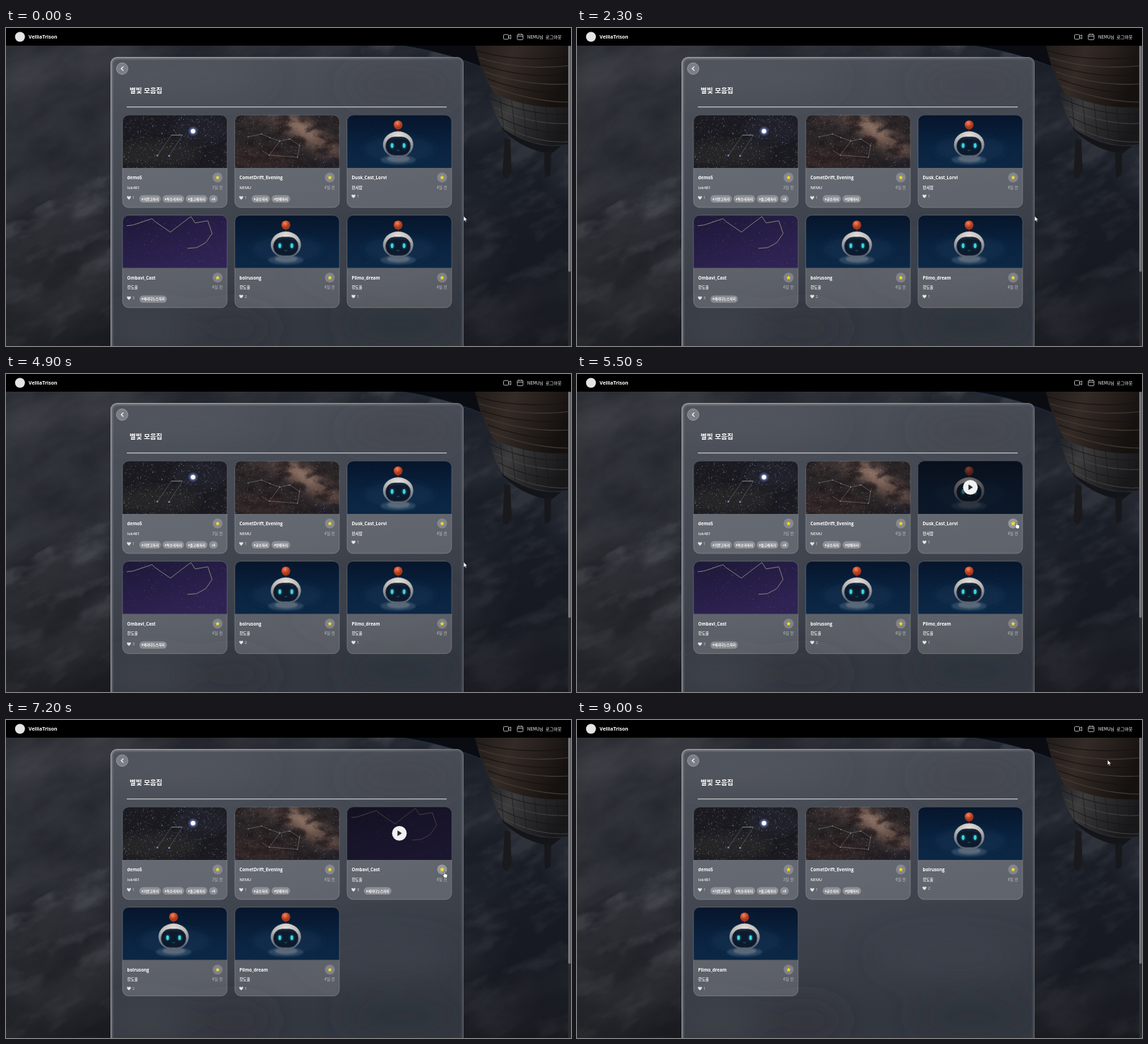
An HTML page that plays this animation: 800x450 px, repeating every 9100 ms.

```html
<!DOCTYPE html>
<html lang="ko">
<head>
<meta charset="utf-8">
<title>Gallery</title>
<style>
html, body { margin: 0; width: 100%; height: 100%; overflow: hidden; background: #000; }
svg { position: absolute; left: 0; top: 0; width: 800px; height: 450px; display: block; }
#back { will-change: transform; }
text { font-family: "Open Sans", "Noto Sans CJK KR", "Noto Sans CJK", sans-serif; fill: #fff; }
.ko { font-family: "Noto Sans CJK KR", "Noto Sans CJK", sans-serif; }
.head { font-size: 6.2px; font-weight: 700; }
.by { font-size: 5.5px; font-weight: 600; fill: #ececee; }
.date { font-size: 5.6px; fill: #bfc1c5; text-anchor: end; }
.count { font-size: 5.4px; fill: #d6d7da; }
.tag { font-size: 4.7px; font-weight: 700; text-anchor: middle; }
</style>
</head>
<body>
<svg id="back" viewBox="0 0 800 450">
  <defs>
    <filter id="clouds" x="0" y="0" width="1" height="1" color-interpolation-filters="sRGB">
      <feTurbulence type="fractalNoise" baseFrequency=".007 .013" numOctaves="6" seed="8"/>
      <feColorMatrix values="0 0 0 0 .34  0 0 0 0 .35  0 0 0 0 .37  1.6 0 0 0 -.5"/>
    </filter>
    <filter id="clumps" x="0" y="0" width="1" height="1" color-interpolation-filters="sRGB">
      <feTurbulence type="fractalNoise" baseFrequency=".014 .03" numOctaves="6" seed="23"/>
      <feColorMatrix values="0 0 0 0 .33  0 0 0 0 .34  0 0 0 0 .37  3.4 0 0 0 -1.65"/>
    </filter>
    <filter id="soft" x="-50%" y="-50%" width="200%" height="200%"><feGaussianBlur stdDeviation="22"/></filter>
    <filter id="glow" x="-5%" y="-5%" width="110%" height="110%"><feGaussianBlur stdDeviation="1.6"/></filter>
    <linearGradient id="earth" x2="1" y2=".45">
      <stop offset="0" stop-color="#26292f"/><stop offset=".3" stop-color="#23262c"/>
      <stop offset=".75" stop-color="#1e222b"/><stop offset="1" stop-color="#1a1d25"/>
    </linearGradient>
    <linearGradient id="fall" x2="0" y2="1">
      <stop offset=".5" stop-color="#121216" stop-opacity="0"/><stop offset="1" stop-color="#121216" stop-opacity=".5"/>
    </linearGradient>
    <linearGradient id="gold" x2="1" y2=".3">
      <stop offset="0" stop-color="#211c1a"/><stop offset=".4" stop-color="#342b27"/><stop offset="1" stop-color="#15110f"/>
    </linearGradient>
    <linearGradient id="steel" x2="1" y2=".4">
      <stop offset="0" stop-color="#1f2125"/><stop offset=".35" stop-color="#3d3c3d"/>
      <stop offset=".65" stop-color="#29282a"/><stop offset="1" stop-color="#18181a"/>
    </linearGradient>
    <linearGradient id="glass" x2=".25" y2="1">
      <stop offset="0" stop-color="#4f535b"/><stop offset=".5" stop-color="#424751"/><stop offset="1" stop-color="#343841"/>
    </linearGradient>
    <linearGradient id="edge"><stop offset="0" stop-color="#fff"/><stop offset=".8" stop-color="#fff" stop-opacity=".8"/><stop offset="1" stop-color="#fff" stop-opacity=".4"/></linearGradient>
    <clipPath id="pane"><path d="M148 450V50a9 9 0 0 1 9-9H639a9 9 0 0 1 9 9V450Z"/></clipPath>
  </defs>
  <rect width="800" height="450" fill="url(#earth)"/>
  <rect x="-250" y="-250" width="1300" height="1000" transform="rotate(-28 150 220)" filter="url(#clouds)" opacity=".55"/>
  <rect x="-250" y="200" width="1300" height="600" transform="rotate(-28 150 220)" filter="url(#clumps)" opacity=".6"/>
  <rect x="640" y="25" width="160" height="425" fill="#181c27" opacity=".4"/>
  <rect width="800" height="450" fill="url(#fall)"/>
  <path d="M560 25Q712 48 800 140V25Z" fill="#0a0c12"/>
  <path d="M560 25Q712 48 800 140" fill="none" stroke="#28405f" stroke-width="1.6" opacity=".4"/>
  <g id="craft"></g>
  <g clip-path="url(#pane)">
    <rect x="148" y="41" width="500" height="409" fill="url(#glass)"/>
    <g filter="url(#soft)">
      <ellipse cx="250" cy="70" rx="120" ry="22" fill="#5c6067" opacity=".4"/>
      <ellipse cx="560" cy="80" rx="80" ry="20" fill="#40444d" opacity=".5"/>
      <ellipse cx="200" cy="430" rx="60" ry="26" fill="#494b51" opacity=".5"/>
      <ellipse cx="320" cy="425" rx="60" ry="25" fill="#30333a" opacity=".5"/>
      <ellipse cx="530" cy="335" rx="110" ry="28" fill="#464a53" opacity=".4"/>
      <ellipse cx="560" cy="420" rx="90" ry="30" fill="#2f323a" opacity=".5"/>
    </g>
    <path d="M148 460V50a9 9 0 0 1 9-9H639a9 9 0 0 1 9 9V460" fill="none" stroke="url(#edge)" stroke-width="5" opacity=".33" filter="url(#glow)"/>
    <path d="M148.5 460V50a8.5 8.5 0 0 1 8.5-8.5H639a8.5 8.5 0 0 1 8.5 8.5V460" fill="none" stroke="url(#edge)" opacity=".25"/>
  </g>
  <rect width="800" height="25" fill="#000"/>
  <circle cx="19.8" cy="12.5" r="7" fill="#e4e4e6"/>
  <text x="32" y="14.8" font-size="7" font-weight="700">VelliaTrison</text>
  <g fill="none" stroke="#d8d8da" stroke-width=".8" stroke-linejoin="round">
    <rect x="704.5" y="9.3" width="7" height="6.6" rx="1.2"/><path d="M711.5 11.8l3.3-2v5.6l-3.3-2"/>
    <rect x="724" y="9" width="8" height="7.6" rx="1.2"/><path d="M724 11.6h8M726 8v2M730 8v2"/>
  </g>
  <text class="ko" x="738" y="14.8" font-size="6.1" font-weight="500">NEMU님</text>
  <text class="ko" x="764" y="14.8" font-size="6.2" font-weight="500">로그아웃</text>
  <rect x="796" y="25" width="4" height="425" fill="#2b2c30"/>
  <rect x="796" y="25" width="3.6" height="320" rx="1.8" fill="#74767a"/>
  <circle cx="164.5" cy="57.5" r="8.2" fill="#fff" fill-opacity=".25" stroke="#fff" stroke-opacity=".4" stroke-width=".7"/>
  <path d="M166 54.8l-2.8 2.7 2.8 2.7" fill="none" stroke="#fff" stroke-width="1.1" stroke-linecap="round" stroke-linejoin="round"/>
  <text class="ko" x="175" y="91.6" font-size="9.5" font-weight="700">별빛 모음집</text>
  <rect x="171" y="111.3" width="453" height="1" fill="#e2e3e5"/>
</svg>

<svg id="front" viewBox="0 0 800 450">
  <defs>
    <clipPath id="top"><path d="M0 75V9a9 9 0 0 1 9-9H139.5a9 9 0 0 1 9 9V75Z"/></clipPath>
    <filter id="b1" x="-50%" y="-50%" width="200%" height="200%"><feGaussianBlur stdDeviation="1.2"/></filter>
    <filter id="b6" x="-50%" y="-50%" width="200%" height="200%"><feGaussianBlur stdDeviation="6"/></filter>
    <filter id="dust" x="0" y="0" width="1" height="1" color-interpolation-filters="sRGB">
      <feTurbulence type="fractalNoise" baseFrequency=".05 .09" numOctaves="4" seed="4"/>
      <feColorMatrix values="0 0 0 0 .13  0 0 0 0 .1  0 0 0 0 .11  3.5 0 0 0 -1.5"/>
    </filter>
    <linearGradient id="navy" x2="0" y2="1">
      <stop offset="0" stop-color="#06152b"/><stop offset=".6" stop-color="#0a2340"/><stop offset="1" stop-color="#0c2745"/>
    </linearGradient>
    <linearGradient id="violet" x2=".6" y2="1">
      <stop offset="0" stop-color="#1d1838"/><stop offset="1" stop-color="#2f2354"/>
    </linearGradient>
    <radialGradient id="ball" cx=".4" cy=".3"><stop offset="0" stop-color="#f58a5e"/><stop offset=".5" stop-color="#dc552f"/><stop offset="1" stop-color="#a13a20"/></radialGradient>
    <radialGradient id="shell" cx=".5" cy=".22" r=".8"><stop offset="0" stop-color="#ebe6df"/><stop offset=".5" stop-color="#b9b6b4"/><stop offset="1" stop-color="#4c596b"/></radialGradient>
    <radialGradient id="halo"><stop offset="0" stop-color="#fff"/><stop offset=".3" stop-color="#dfe8ff"/><stop offset=".5" stop-color="#7c8fd8" stop-opacity=".6"/><stop offset="1" stop-color="#4a56a0" stop-opacity="0"/></radialGradient>
    <g id="star"><path d="M0-3.2L.95-1.05 3.2-.9 1.5.65 2 2.9 0 1.7-2 2.9-1.5.65-3.2-.9-.95-1.05Z" fill="#f3dd1c"/></g>
    <path id="heart" d="M0 2.6C-4.2-.4-2.7-2.7-1.3-2.4-.5-2.3 0-1.5 0-1.2 0-1.5.5-2.3 1.3-2.4 2.7-2.7 4.2-.4 0 2.6Z" fill="#e4e5e8"/>
  </defs>
  <g id="cards"></g>
  <g id="hover" transform="translate(482.7 123)">
    <path d="M0 75V9a9 9 0 0 1 9-9H139.5a9 9 0 0 1 9 9V75Z" fill="#0b0c12" fill-opacity=".55"/>
    <circle cx="74.3" cy="37.3" r="10.4" fill="#f1f1f2"/>
    <path d="M72 33.8v7l5.4-3.5Z" fill="#26282d" stroke="#26282d" stroke-width=".6" stroke-linejoin="round"/>
    <circle cx="134.8" cy="88.5" r="7" fill="#fff" fill-opacity=".14"/>
    <use href="#star" x="134.8" y="88.5"/>
  </g>
  <path id="arrow" d="M0 0V7.4L1.7 5.9 2.8 8.4 4 7.9 2.9 5.4H5.2Z" fill="#fff" stroke="#111" stroke-width=".45"/>
  <path id="hand" d="M-.7 4.4V.6a.7.7 0 0 1 1.4 0V3l3 .7q.8.2.7 1L4 7.4 3.5 9H.3L-2.3 5.7q-.3-.9.6-.9Z" fill="#fff" stroke="#111" stroke-width=".5" stroke-linejoin="round"/>
</svg>

<script>
const LOOP = 9100, FIRST = 6050, SECOND = 7950, LEAVE = 8585;
const $ = id => document.getElementById(id);

function rng(seed) {
  return () => {
    seed = (seed * 1664525 + 1013904223) >>> 0;
    return seed / 4294967296;
  };
}

// Dots scattered over a thumbnail, as one path
function dots(n, seed, size, color, opacity) {
  const r = rng(seed);
  let d = '';
  for (let i = 0; i < n; i++) d += `M${(r() * 148).toFixed(1)} ${(r() * 75).toFixed(1)}h.01`;
  return `<path d="${d}" stroke="${color}" stroke-width="${size}" stroke-linecap="round" opacity="${opacity}"/>`;
}

const fill = c => `<rect width="149" height="75" fill="${c}"/>`;
const blob = (x, y, rx, ry, c, o, turn = 0) =>
  `<ellipse rx="${rx}" ry="${ry}" fill="${c}" opacity="${o}" transform="translate(${x} ${y}) rotate(${turn})"/>`;
const line = (d, c, w = .6) =>
  `<path d="${d}" fill="none" stroke="${c}" stroke-width="${w}" stroke-linejoin="round"/>`;

const art = {
  lyre: fill('#1a1a20') +
    `<g filter="url(#b6)">${blob(50, 55, 60, 18, '#2b2829', .7)}${blob(110, 20, 40, 20, '#23232d', .7)}</g>` +
    dots(520, 5, .65, '#9a9aa2', .55) + dots(100, 9, .9, '#d5d3d4', .65) + dots(22, 14, 1.2, '#8f9ce0', .8) +
    line('M69.5 28.5H85', '#c4c8cf', .6) + line('M85 28.5L66 58M69.5 28.5L49.5 57.5', '#7d838f', .45) +
    `<circle cx="49.5" cy="57.5" r="1.2" fill="#7f90ee"/><circle cx="66" cy="58" r="1.2" fill="#7f90ee"/>
     <circle cx="100" cy="23" r="8" fill="url(#halo)"/><circle cx="100" cy="23" r="3" fill="#fff"/>`,
  galaxy: fill('#2a2628') +
    `<g filter="url(#b6)">${blob(30, 62, 50, 16, '#362725', .6)}${blob(60, 8, 50, 12, '#443a39', .7)}
     ${blob(104, 28, 58, 15, '#6e574e', .8, 32)}${blob(97, 20, 24, 7, '#a58676', .7, 32)}${blob(140, 70, 32, 14, '#20202b', .8)}</g>
     <rect width="149" height="75" filter="url(#dust)" opacity=".75"/>` +
    dots(480, 21, .6, '#a8978f', .5) + dots(90, 25, .8, '#e4d0c4', .6) + dots(50, 29, 1, '#6c79b5', .45) +
    line('M19 31L38 27 50 32 64 37 49 57 64 58 89 60 92 43 78 34 64 37M49 57L38 50', '#a7a09d', .4) +
    '<path d="M19 31h.01M38 27h.01M50 32h.01M64 37h.01M49 57h.01M89 60h.01M92 43h.01M78 34h.01" stroke="#e4e0de" stroke-width="1.2" stroke-linecap="round"/>',
  robot: fill('url(#navy)') +
    `<g filter="url(#b6)">${blob(74, 48, 50, 18, '#12375b', .4)}</g>` +
    dots(45, 33, .6, '#5c7ba0', .35) +
    `<g filter="url(#b1)">${blob(72.5, 63.5, 25, 6.5, '#38526c', .7)}${blob(73, 62, 16, 5, '#7d868f', .55)}</g>
     <path d="M72.5 19v5" stroke="#6e2d20" stroke-width="1.2"/>
     <circle cx="72.5" cy="14" r="6.3" fill="url(#ball)"/>
     <ellipse cx="72.5" cy="42" rx="21.5" ry="18.7" fill="url(#shell)"/>
     <rect x="54.8" y="31" width="35.4" height="26.4" rx="12.8" fill="#0d1a2d" stroke="#4f5a6a" stroke-width=".8"/>
     <path d="M61 35q11-4 23 0" fill="none" stroke="#2c4562" stroke-width="1" opacity=".5"/>
     <g filter="url(#b1)" opacity=".4"><ellipse cx="64" cy="43.3" rx="3" ry="4.4" fill="#20bccb"/><ellipse cx="81" cy="43.3" rx="3" ry="4.4" fill="#20bccb"/></g>
     <ellipse cx="64" cy="43.3" rx="2" ry="3.4" fill="#3fd6df"/><ellipse cx="81" cy="43.3" rx="2" ry="3.4" fill="#3fd6df"/>
     <path d="M70.5 49.8q2 1.4 4 0" fill="none" stroke="#2a7f92" stroke-width=".7"/>`,
  river: fill('url(#violet)') +
    dots(200, 41, .55, '#7f739f', .5) + dots(25, 45, .8, '#b3a8cc', .5) +
    line('M6 15L15 14 42 5 46 9 68 24 81 14 97 2 103 11 121 8 127 26 118 39 105 46 92 47', '#a8ae8c', .7)
};

const tags = {
  lyre: [['#거문고자리', 24, 30.5], ['#독수리자리', 56.8, 30.7], ['#돌고래자리', 89.7, 30.7], ['+6', 122.8, 12.2]],
  galaxy: [['#궁수자리', 24, 26], ['#방패자리', 52.2, 26.4]],
  robot: [],
  river: [['#에리다누스자리', 24, 39]]
};

// image, title, author, days, likes, slot in each of the three layouts
const items = [
  ['lyre', 'demo5', 'lok481', 3, 1, [0, 0, 0]],
  ['galaxy', 'CometDrift_Evening', 'NEMU', 4, 1, [1, 1, 1]],
  ['robot', 'Dusk_Cast_Lorvi', '민서람', 4, 1, [2, -1, -1]],
  ['river', 'Ombavi_Cast', '강도율', 4, 3, [3, 2, -1]],
  ['robot', 'bolrusong', '강도율', 4, 2, [4, 3, 2]],
  ['robot', 'Plimo_dream', '강도율', 4, 1, [5, 4, 3]]
];

function card([img, title, by, days, likes]) {
  const list = tags[img], y = list.length ? 117.3 : 115.2;
  const pills = list.map(([s, x, w]) =>
    `<rect x="${x}" y="113.6" width="${w}" height="10.4" rx="5.2" fill="#fff" fill-opacity=".27"/>
     <text class="tag ko" x="${x + w / 2}" y="120.6">${s}</text>`).join('');
  return `<g><rect class="box" width="148.5" height="131" rx="9" fill="#fff" fill-opacity=".18"/>
    <g clip-path="url(#top)">${art[img]}</g>
    <rect class="box" x=".3" y=".3" width="147.9" height="131" rx="8.7" fill="none" stroke="#fff" stroke-opacity=".24" stroke-width=".7"/>
    <text class="head" x="6.8" y="90.8">${title}</text>
    <circle cx="134.8" cy="88.5" r="7" fill="#fff" fill-opacity=".22"/><use href="#star" x="134.8" y="88.5"/>
    <text class="by" x="6.8" y="104.7">${by}</text>
    <text class="date ko" x="142" y="104.7">${days}일 전</text>
    <use href="#heart" x="9.3" y="${y}"/><text class="count" x="14.2" y="${y + 2}">${likes}</text>${pills}</g>`;
}

$('cards').innerHTML = items.map(card).join('');
const nodes = [...$('cards').children];

function drawCraft() {
  let s = '<path d="M664 25H800V118Q735 118 690 92Q672 62 664 25Z" fill="url(#gold)"/>';
  for (let i = 0; i < 6; i++)
    s += line(`M${666 + i * 4} ${32 + i * 10}Q${725 + i * 4} ${50 + i * 11} 800 ${40 + i * 13}`, i % 2 ? '#463a32' : '#17120f', 1.2);
  s += '<path d="M682 88Q735 116 800 112V164Q750 172 706 144Q690 124 682 88Z" fill="url(#steel)"/>';
  for (let i = 0; i < 4; i++)
    s += line(`M${685 + i * 6} ${99 + i * 13}Q${740 + i * 3} ${125 + i * 13} 800 ${122 + i * 13}`, i % 2 ? '#4a4847' : '#161618', .9);
  for (let i = 0; i < 6; i++) s += line(`M${700 + i * 16} ${100 + i * 3}l5 48`, '#19191b', .7);
  s += '<path d="M700 140Q742 170 786 167L772 178Q728 172 700 140Z" fill="#141518"/>' +
    '<path d="M706 156l8 2 2 46-7 10-6-5Z" fill="#1a1a1d"/><path d="M762 176l10-2-1 34-8 4Z" fill="#17181b"/>';
  $('craft').innerHTML = s;
}
drawCraft();

const path = [[0, 648, 266.2], [5050, 648, 266.2], [5450, 622.3, 210], [5850, 622.3, 210], [6080, 620.7, 209],
  [6650, 620.7, 209], [7150, 620.7, 214.6], [8500, 620.7, 214.6], [9000, 751.2, 56.4], [LOOP, 751.2, 56.4]];

const ramp = (t, from, len) => {
  const p = Math.min(1, Math.max(0, (t - from) / len));
  return p * p * (3 - 2 * p);
};

function pointer(t) {
  const i = path.findIndex((p, k) => k && t <= p[0]);
  const a = path[i - 1], b = path[i], p = ramp(t, a[0], b[0] - a[0]);
  return [a[1] + (b[1] - a[1]) * p, a[2] + (b[2] - a[2]) * p];
}

let shown = -1;
function arrange(state) {
  if (state === shown) return;
  shown = state;
  nodes.forEach((g, i) => {
    const slot = items[i][5][state], row = Math.floor(slot / 3), col = slot % 3;
    g.style.display = slot < 0 ? 'none' : '';
    if (slot < 0) return;
    g.setAttribute('transform', `translate(${164.8 + col * 158.95} ${123 + row * 141.8})`);
    const h = row && state ? 126 : 131.3;
    g.querySelectorAll('.box').forEach((r, k) => r.setAttribute('height', h - k * .6));
  });
}

function draw(t) {
  const state = t < FIRST ? 0 : t < SECOND ? 1 : 2;
  arrange(state);
  const enter = [5250, FIRST, SECOND][state];
  $('hover').setAttribute('opacity', ramp(t, enter, 250) * (1 - ramp(t, LEAVE, 270)));
  const [x, y] = pointer(t), over = t > 5270 && t < LEAVE;
  $('arrow').style.display = over ? 'none' : '';
  $('hand').style.display = over ? '' : 'none';
  $(over ? 'hand' : 'arrow').setAttribute('transform', `translate(${x} ${y})`);
}

const start = performance.now();
function tick() {
  draw((performance.now() - start) % LOOP);
  requestAnimationFrame(tick);
}
tick();
</script>
</body>
</html>
```
